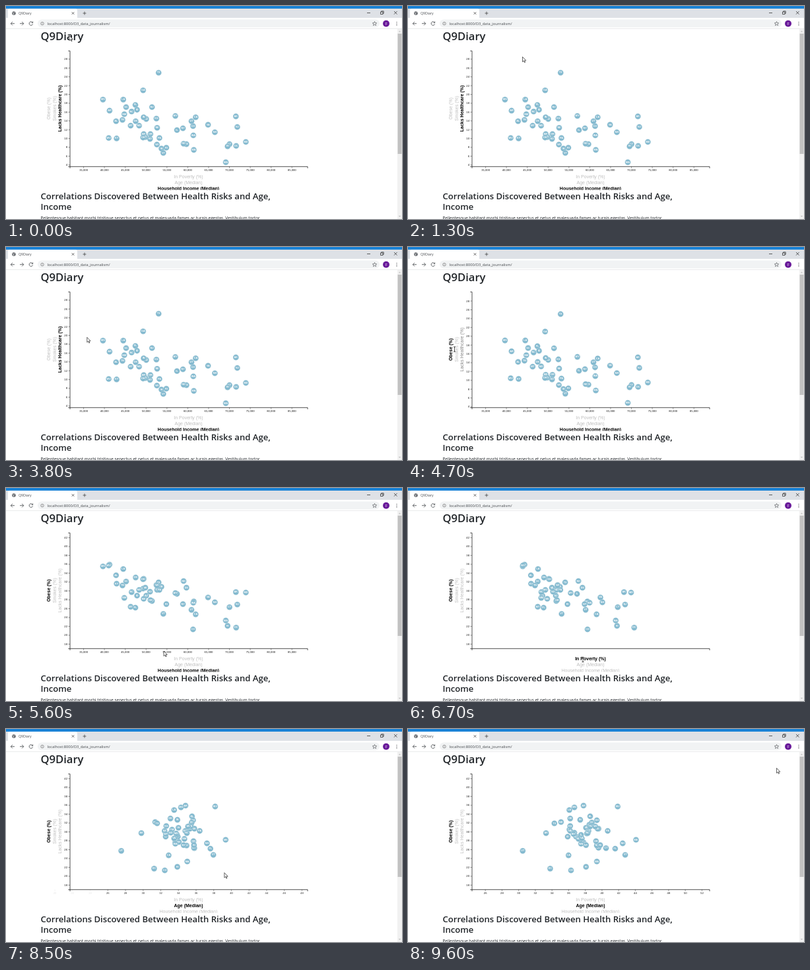
Animation, 600 px wide and 324 px high, one loop 9.7 s. Source, as an HTML page with a canvas:

```html
<!DOCTYPE html>
<html lang="en">
<head>
<meta charset="utf-8">
<title>Q9Diary</title>
<style>
html, body { margin: 0; width: 100%; height: 100%; overflow: hidden; background: #fff; }
canvas { display: block; width: 600px; height: 324px; }
</style>
</head>
<body>
<canvas id="stage"></canvas>
<script>
const W = 600, H = 324, LOOP = 9700, STEP = 100;
const canvas = document.getElementById('stage');
const ratio = window.devicePixelRatio || 1;
canvas.width = W * ratio;
canvas.height = H * ratio;
const c = canvas.getContext('2d');

const ARIAL = '"Liberation Sans", sans-serif';
const UI = '"Open Sans", sans-serif';
const NAME = 'Q9Diary';

// One entry per state, all lists in the same order.
const abbr = ('AL AK AZ AR CA CO CT DE DC FL GA HI ID IL IN IA KS KY LA ME MD MA MI MN MS MO ' +
  'MT NE NV NH NJ NM NY NC ND OH OK OR PA RI SC SD TN TX UT VT VA WA WV WI WY').split(' ');
const poverty = [19.3, 11.2, 18.2, 18.9, 16.4, 12, 10.8, 12.5, 17.7, 16.5, 18.3, 11.4, 14.8,
  14.4, 15.2, 12.2, 13.6, 19.1, 19.8, 14.1, 10.1, 11.6, 16.2, 11.5, 21.5, 15.5,
  15.4, 12.4, 15.2, 9.2, 11.1, 21.3, 15.9, 17.2, 11.5, 15.8, 16.6, 16.6, 13.6,
  14.3, 18, 14.2, 18.3, 17.2, 11.7, 12.2, 11.8, 13.2, 18.3, 13.2, 11.2];
const age = [38.6, 33.3, 36.9, 37.8, 36, 36.3, 40.5, 39.6, 33.8, 41.6, 36.1, 38.1, 35.9,
  37.5, 37.4, 38.1, 36.2, 38.5, 36.1, 44.1, 38.2, 39.4, 39.5, 37.8, 36.7, 38.4,
  39.6, 36.2, 37.6, 42.5, 39.4, 37.2, 38.1, 38.3, 35.1, 39.4, 36.2, 39.3, 40.7,
  39.8, 38.8, 36.7, 38.6, 34.3, 30.5, 42.8, 37.6, 37.5, 41.9, 39.2, 36.6];
const income = [42830, 71583, 50068, 41262, 61933, 61303, 70048, 59716, 71648, 47463, 49321, 69592, 47861,
  57444, 49446, 53712, 52504, 42958, 44555, 49462, 73971, 69160, 49847, 61481, 39680, 48363,
  46328, 52686, 51450, 66532, 71919, 44803, 58878, 46556, 59029, 49308, 47529, 51075, 53234,
  54891, 45238, 50979, 44361, 53035, 60922, 54166, 64902, 61366, 41059, 52622, 57055];
const healthcare = [13.9, 15, 14.4, 16.3, 14.8, 12.8, 8.7, 8.7, 8.3, 17.6, 20.9, 8.2, 16.5,
  11.9, 14.8, 7.7, 14.5, 10, 18.8, 11, 9.2, 4.6, 10.3, 7.4, 18.8, 12.9,
  12.9, 12.4, 17.1, 11.4, 12.6, 15.5, 12.3, 16.1, 8.8, 10.2, 13.9, 11, 10.1,
  7.9, 17.1, 9.9, 14.2, 24.9, 13.9, 6.7, 13.1, 10.7, 10.1, 8.6, 15.1];
const obesity = [33.5, 29.7, 28.9, 35.9, 24.7, 21.3, 26.3, 30.7, 21.7, 26.2, 30.5, 22.1, 28.9,
  29.3, 32.7, 30.9, 31.3, 31.6, 34.9, 28.2, 29.6, 23.3, 30.7, 27.6, 35.5, 30.2,
  26.4, 30.2, 27.7, 27.4, 26.9, 28.4, 27, 29.7, 32.2, 32.6, 33, 27.9, 30.2,
  27, 32.1, 29.8, 31.2, 31.9, 25.7, 24.8, 28.5, 27.3, 35.7, 31.2, 29.5];

const LEFT = 97, RIGHT = 457, TOP = 68.3, BOTTOM = 244;
const mix = (a, b, k) => a + (b - a) * k;
const cubic = p => p < 0.5 ? 4 * p ** 3 : 1 - 4 * (1 - p) ** 3;
const progress = (t, start) => cubic(Math.min(1, Math.max(0, (t - start) / 1000)));

// A linear scale padded by 20% at both ends.
function makeScale(data, from, to, step) {
  const lo = Math.min(...data) * 0.8, hi = Math.max(...data) * 1.2;
  const ticks = [];
  for (let v = Math.ceil(lo / step) * step; v <= hi; v += step) ticks.push(v);
  return { data, ticks, at: v => mix(from, to, (v - lo) / (hi - lo)) };
}
const xScales = {
  poverty: makeScale(poverty, LEFT, RIGHT, 2),
  age: makeScale(age, LEFT, RIGHT, 2),
  income: makeScale(income, LEFT, RIGHT, 5000)
};
const yScales = {
  healthcare: makeScale(healthcare, BOTTOM, TOP, 2),
  obesity: makeScale(obesity, BOTTOM, TOP, 2)
};

const CLICK = { obesity: 4550, poverty: 6390, age: 7800 };

function text(s, x, y, font, color, align = 'left') {
  c.font = font;
  c.fillStyle = color;
  c.textAlign = align;
  c.fillText(s, x, y);
}
function box(x, y, w, h, color) {
  c.fillStyle = color;
  c.fillRect(x, y, w, h);
}
function disc(x, y, r, color) {
  c.fillStyle = color;
  c.beginPath();
  c.arc(x, y, r, 0, 7);
  c.fill();
}
function stroke(d, color, width = 0.8) {
  c.strokeStyle = color;
  c.lineWidth = width;
  c.stroke(new Path2D(d));
}

function drawBrowser() {
  box(0, 0, W, H, '#fff');
  box(0, 0, W, 18, '#dee1e6');
  box(0, 0, W, 4, '#1a82d6');
  c.fillStyle = '#fff';
  c.beginPath();
  c.roundRect(3, 4, 105, 16, [3, 3, 0, 0]);
  c.fill();
  disc(12, 11, 2.8, '#5f6368');
  stroke('M10 10.2 L12 11 L11.4 13 M12.5 8.8 L14 10.5', '#fff', 0.7);
  text(NAME, 19, 13, '5.2px ' + UI, '#45494d');
  stroke('M99.7 9.2 l3.6 3.6 m0 -3.6 l-3.6 3.6', '#444');
  stroke('M116.5 11 h5 m-2.5 -2.5 v5', '#444');
  stroke('M547 10.5 h5 M567.5 9 h3.5 v3.5 h-3.5 z M568.7 9 v-1.2 h3.5 v3.5 h-1.2 M588 8 l4.6 4.6 m0 -4.6 l-4.6 4.6', '#222', 0.7);

  box(0, 18, W, 16.5, '#fff');
  c.fillStyle = '#f1f3f4';
  c.beginPath();
  c.roundRect(48, 20.5, 518, 12, 6);
  c.fill();
  stroke('M13 26.7 H7.2 m2.7 -2.7 l-2.7 2.7 l2.7 2.7', '#55585c', 0.9);
  stroke('M21 26.7 h5.8 m-2.7 -2.7 l2.7 2.7 l-2.7 2.7', '#55585c', 0.9);
  stroke('M40.2 25 A2.8 2.8 0 1 0 40.6 27.4 M40.7 23.6 v2 h-2', '#55585c', 0.9);
  c.strokeStyle = '#777';
  c.lineWidth = 0.7;
  c.beginPath();
  c.arc(55, 26.7, 2.3, 0, 7);
  c.stroke();
  stroke('M55 26.3 v1.6 M55 25 v0.7', '#777', 0.6);
  text('localhost:8000/D3_data_journalism/', 62.5, 28.8, '5.7px ' + UI, '#44484c');
  stroke('M558.5 23.6 l0.9 2.1 2.3 0.2 -1.8 1.5 0.6 2.2 -2 -1.2 -2 1.2 0.6 -2.2 -1.8 -1.5 2.3 -0.2 z', '#55585c', 0.7);
  disc(576, 26.8, 5, '#6a1b9a');
  text('F', 576, 28.7, '5.2px ' + UI, '#fff', 'center');
  for (const y of [24.6, 26.8, 29]) disc(592, y, 0.65, '#55585c');
  box(0, 34.2, W, 0.6, '#dcdee0');

  box(593, 35, 7, 289, '#f1f1f1');
  box(593.5, 42, 6, 183, '#c1c1c1');
  c.fill(new Path2D('M594.8 39.4 l1.7 -2 l1.7 2 z M594.8 319 l1.7 2 l1.7 -2 z'));
}

function drawPage() {
  const ink = '#212529';
  text(NAME, 52.5, 52.3, '600 16.6px ' + UI, ink);
  text('Correlations Discovered Between Health Risks and Age,', 52.5, 293.6, '600 13.1px ' + UI, ink);
  text('Income', 52.5, 310.3, '600 13.1px ' + UI, ink);
  text('Pellentesque habitant morbi tristique senectus et netus et malesuada fames ac turpis egestas. Vestibulum tortor',
    52.5, 324.8, '6.35px ' + UI, ink);
}

// Shared ticks slide, old ones fade out and new ones fade in.
function drawTicks(from, to, k, place) {
  for (const v of new Set([...from.ticks, ...to.ticks])) {
    const before = from.ticks.includes(v), after = to.ticks.includes(v);
    c.globalAlpha = before && after ? 1 : before ? 1 - k : k;
    if (c.globalAlpha > 0.01) place(mix(from.at(v), to.at(v), k), v.toLocaleString('en-US'));
  }
  c.globalAlpha = 1;
}

function drawLabel(s, x, y, active, hover, turned, shade = '#bfbfbf') {
  c.save();
  c.translate(x, y);
  if (turned) c.rotate(-Math.PI / 2);
  text(s, 0, 0, (active ? 'bold ' : '') + '7px ' + ARIAL, active || hover ? '#000' : shade, 'center');
  c.restore();
}

function drawChart(t) {
  const ky = progress(t, CLICK.obesity);
  const toAge = t >= CLICK.age;
  const kx = progress(t, toAge ? CLICK.age : CLICK.poverty);
  const x0 = toAge ? xScales.poverty : xScales.income;
  const x1 = toAge ? xScales.age : xScales.poverty;
  const y0 = yScales.healthcare, y1 = yScales.obesity;
  const tickFont = '4.2px ' + ARIAL;

  c.save();
  c.beginPath();
  c.rect(53, 60, 415, 219.8);
  c.clip();

  stroke(`M94.3 ${TOP} H${LEFT} V${BOTTOM + 0.3} H94.3`, '#222', 0.8);
  stroke(`M${LEFT} 246.8 V${BOTTOM + 0.3} H${RIGHT} V246.8`, '#222', 0.8);
  drawTicks(y0, y1, ky, (y, s) => {
    stroke(`M94.5 ${y} H${LEFT}`, '#333', 0.5);
    text(s, 93, y + 1.4, tickFont, '#111', 'right');
  });
  drawTicks(x0, x1, kx, (x, s) => {
    stroke(`M${x} ${BOTTOM} V246.5`, '#333', 0.5);
    text(s, x, 251.4, tickFont, '#111', 'center');
  });

  abbr.forEach((name, i) => {
    const x = mix(x0.at(x0.data[i]), x1.at(x1.data[i]), kx) - 0.2;
    const y = mix(y0.at(y0.data[i]), y1.at(y1.data[i]), ky) - 0.2;
    disc(x, y, 4.3, '#82b9cf');
    c.strokeStyle = '#d5e2e8';
    c.lineWidth = 0.4;
    c.stroke();
    text(name, x, y + 1, 'bold 3.8px ' + ARIAL, '#fff', 'center');
  });

  const onObesity = t >= CLICK.obesity;
  const onPoverty = t >= CLICK.poverty && !toAge;
  drawLabel('Obese (%)', 67, 156, onObesity, false, true);
  drawLabel('Smokes (%)', 75.5, 156, false, false, true);
  drawLabel('Lacks Healthcare (%)', 84.2, 156, !onObesity, false, true, t < 5000 ? '#888' : '#bfbfbf');
  drawLabel('In Poverty (%)', 276.5, 262, onPoverty);
  drawLabel('Age (Median)', 276.5, 270.8, toAge, t >= 7300);
  drawLabel('Household Income (Median)', 276.5, 279.6, t < CLICK.poverty);
  c.restore();
}

const stops = [[0, 96, 45], [300, 96, 45], [2100, 229, 100.5], [3000, 229, 100.5], [4300, 70.5, 155.5],
  [4800, 70.5, 155.5], [5600, 239, 248], [6250, 265, 261], [6900, 265, 261], [7500, 264.5, 265],
  [8100, 264.5, 265], [9400, 558.5, 59.5], [LOOP, 558.5, 59.5]];

function pointerAt(t) {
  const i = stops.findIndex(s => s[0] > t);
  const [ta, xa, ya] = stops[i - 1], [tb, xb, yb] = stops[i];
  const p = (t - ta) / (tb - ta), k = p * p * (3 - 2 * p);
  return [mix(xa, xb, k), mix(ya, yb, k)];
}

const ARROW = new Path2D('M0 0 V7.6 L1.8 6 L3 8.7 L4.1 8.2 L2.9 5.6 H5.3 Z');
const HAND = new Path2D('M0 0 Q.9 -.6 1.5 .2 V3 L4.6 3.8 Q5.3 4.2 5 5.2 L4.2 8.7 H.4 L-2 5.6 Q-2 4.5 -1 4.8 L0 5.6 Z');

function drawPointer(t) {
  const [x, y] = pointerAt(t);
  const beam = (t >= 4200 && t < 4900) || (t >= 6200 && t < 7000);
  c.save();
  c.translate(x, y);
  if (beam) {
    stroke('M-1.6 -3.6 H1.6 M0 -3.6 V3.6 M-1.6 3.6 H1.6', '#222', 0.8);
  } else {
    const shape = t >= 7000 && t < 8200 ? HAND : ARROW;
    c.fillStyle = '#fff';
    c.fill(shape);
    c.strokeStyle = '#222';
    c.lineWidth = 0.7;
    c.stroke(shape);
  }
  c.restore();
}

function draw(t) {
  c.setTransform(ratio, 0, 0, ratio, 0, 0);
  drawBrowser();
  drawPage();
  drawChart(t);
  drawPointer(t);
}

const begin = performance.now();
function tick() {
  const t = (performance.now() - begin) % LOOP;
  draw(Math.floor(t / STEP) * STEP);
  requestAnimationFrame(tick);
}
tick();
</script>
</body>
</html>
```
